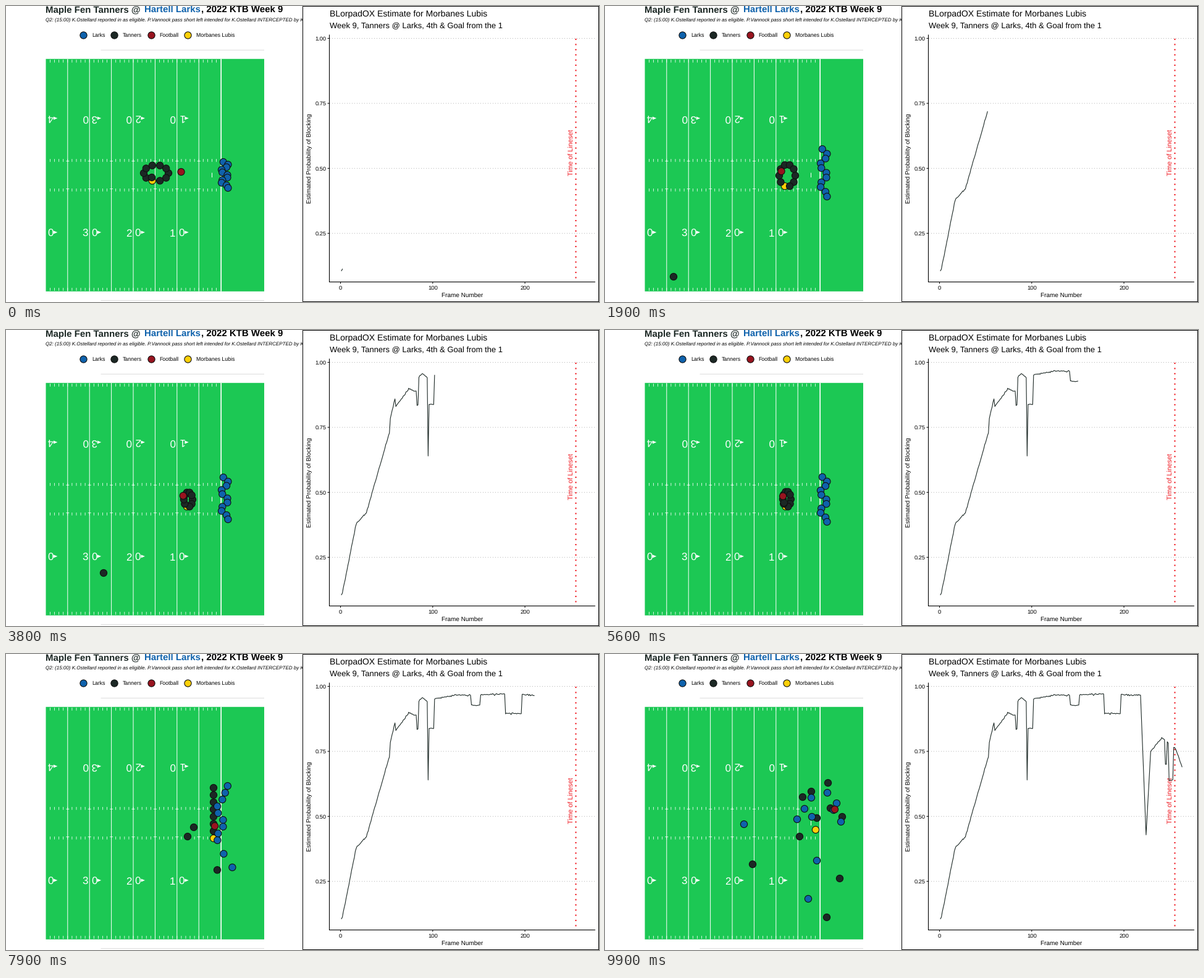
A matplotlib script for the animation above (10 s loop, 960 by 480 pixels).

```python
import matplotlib.pyplot as plt
import numpy as np
from matplotlib.animation import FuncAnimation
from matplotlib.patches import Polygon, Rectangle

plt.rcParams.update({"font.family": "Liberation Sans",
                     "text.hinting": "none", "path.snap": False})

W, H, FRAMES = 960, 480, 100
PT = 0.72  # points per pixel at 100 dpi
NAVY, DARK, BROWN, GOLD = "#0f62ac", "#1c2825", "#98141f", "#fdd008"
GREEN, RED = "#1cc854", "#f01820"

fig = plt.figure(figsize=(W / 100, H / 100), dpi=100, facecolor="white")
ax = fig.add_axes([0, 0, 1, 1])
ax.set(xlim=(0, W), ylim=(H, 0))
ax.axis("off")


def text(x, y, s, size, color="black", z=3, **kw):
    return ax.text(x, y, s, fontsize=size * PT, color=color, zorder=z,
                   va="baseline", rotation_mode="anchor", **kw)


def line(x0, y0, x1, y1, color="black", width=1.0, z=2, **kw):
    ax.plot([x0, x1], [y0, y1], color=color, lw=width * PT, zorder=z,
            solid_capstyle="butt", dash_capstyle="butt", **kw)


def dots(points, colors):
    return ax.scatter(*np.transpose(points), s=(11.2 * PT) ** 2, c=colors,
                      edgecolors="#101010", linewidths=1.1 * PT, zorder=4)


# ---- field panel ----
def draw_header():
    text(64.5, 11, "Maple Fen Tanners @", 15, DARK, weight="bold")
    text(224.5, 11, "Hartell Larks", 15, NAVY, weight="bold")
    text(316, 11, ", 2022 KTB Week 9", 15, weight="bold")
    text(64.5, 25.5, "Q2: (15:00) K.Ostellard reported in as eligible. "
         "P.Vannock pass short left intended for K.Ostellard "
         "INTERCEPTED by K", 8, style="italic")
    for x, color, label in ((125, NAVY, "Larks"), (174.5, DARK, "Tanners"),
                            (234.5, BROWN, "Football"),
                            (294, GOLD, "Morbanes Lubis")):
        dots([(x, 46.5)], [color])
        text(x + 14, 50, label, 8.8)
    for y in (71.5, 477.5):
        line(153.5, y, 418, y, "#dcdcdc")


def draw_field():
    left, right, top, bottom, goal, yard = 64.5, 418, 85.8, 462.8, 347.6, 7.08
    ax.add_patch(Rectangle((left, top), right - left, bottom - top,
                           fc=GREEN, ec="none", zorder=1))
    marks = goal - yard * np.arange(1, 40)
    for y in (87, 248, 296, 457):
        ax.vlines(marks, y, y + 4.7, color="white", lw=0.8 * PT, zorder=2)
    for i in range(1, 8):
        x = goal - 5 * yard * i
        line(x, top, x, bottom, "white")
        for y in (251.5, 296.5):
            line(x - 2.5, y, x + 2.5, y, "white", 0.8)
    line(348.2, top, 348.2, bottom, "white", 1.7)
    line(333.5, 270.5, 333.5, 278, "white")

    for n in range(1, 5):
        x = goal - 10 * yard * n
        outer = [(str(n), "0")] if n < 4 else []  # the 40 is cut by the edge
        for low, high in outer:
            text(x - 7, 374, low, 17, "white", ha="center")
            text(x - 7, 176, high, 17, "white", ha="center", rotation=180)
        text(x + 7.5, 374, "0", 17, "white", ha="center")
        text(x + 7.5, 176, str(n), 17, "white", ha="center", rotation=180)
        for y in (182, 367):
            ax.add_patch(Polygon([(x + 12.5, y - 2.6), (x + 19, y),
                                  (x + 12.5, y + 2.6)],
                                 fc="white", ec="none", zorder=3))


# ---- chart panel ----
def chart_x(n):
    return 541.6 + 1.4925 * n


def chart_y(p):
    return 52.5 + 421.6 * (1 - p)


def draw_chart():
    ax.add_patch(Rectangle((480.5, 0.5), 479, 479, fc="white", ec="black",
                           lw=PT, zorder=5))
    text(523.5, 17, "BLorpadOX Estimate for Morbanes Lubis", 14, z=6)
    text(523.5, 36, "Week 9, Tanners @ Larks, 4th & Goal from the 1", 13, z=6)
    for p in (0.25, 0.5, 0.75, 1):
        y = chart_y(p)
        line(524, y, 954, y, "#b4b4b4", 1, 6, ls=(0, (1, 3)))
        line(520.5, y, 523.5, y, z=6)
        text(518.5, y + 3.3, f"{p:.2f}", 9.3, z=6, ha="right")
    for n in (0, 100, 200):
        x = chart_x(n)
        line(x, 447.5, x, 450.5, z=6)
        text(x, 460, str(n), 9.5, z=6, ha="center")
    line(523.5, 46.5, 523.5, 448, width=1.1, z=6)
    line(523, 447.5, 954, 447.5, width=1.1, z=6)
    text(738.7, 472, "Frame Number", 10, z=6, ha="center")
    text(493.5, 247, "Estimated Probability of Blocking", 10, z=6,
         rotation=90, ha="center")
    line(922.5, 53, 922.5, 447, RED, 2.1, 6, ls=(0, (1, 3)))
    text(918.5, 238, "Time of Lineset", 11, RED, 6, rotation=90, ha="center")


def probability(n):
    """Slow trend, sudden drops to a lower level, and a little jitter."""
    trend = [(1, .107), (2, .113), (17, .38), (28, .422), (53, .73),
             (54, .785), (59, .86), (60, .83), (74, .898), (82, .89),
             (85, .944), (89, .959), (94, .942), (104, .953), (123, .965),
             (172, .97), (218, .966), (224, .429), (229, .75), (241, .802),
             (256, .76), (263, .69)]
    drops = [(83, 84, .833), (95, 95, .638), (96, 101, .838),
             (142, 151, .927), (179, 196, .896), (245, 246, .7),
             (249, 253, .638)]
    p = np.interp(n, *np.transpose(trend))
    for first, last, level in drops:
        p[(n >= first) & (n <= last)] = level
    return p + np.random.default_rng(4).normal(0, 0.0015, n.size)


# ---- formations: 10 in the huddle ring, then 11 defenders ----
slot = np.arange(10)
back = np.arange(11)
depth = 6 * np.cos(2 * np.pi * (back - 5.5) / 4.2)  # staggered rows
END, PASSER, RUNNER = 3, 5, 4                       # ring slots


def formation(ox, oy, dx, dy):
    return np.vstack([np.column_stack([ox, oy]), np.column_stack([dx, dy])])


def huddle(cx, cy, rx, ry, top, bottom):
    a = 2 * np.pi * slot / 10
    return formation(cx + rx * np.cos(a), cy + ry * np.sin(a),
                     354 + depth, np.linspace(top, bottom, 11))


def scrimmage(offense_x, defense_x):
    rank = np.zeros(10)
    rank[[8, 7, 9, 6, 0, 1, 2, END]] = np.arange(8)  # line, top to bottom
    ox, oy = np.full(10, offense_x), 217 + 11.7 * rank
    ox[PASSER], oy[PASSER] = 304, 281
    ox[RUNNER], oy[RUNNER] = 294, 296
    dx = defense_x + depth + 14 * ((back - 5) / 5) ** 8
    return formation(ox, oy, dx, 214 + 11 * back + 11 * np.maximum(back - 8, 0))


whistle = np.array([
    (384, 264), (343, 266), (315, 296), (341, 285), (380, 364),
    (239, 341), (365, 250), (334, 223), (361, 209), (320, 232),
    (360, 225), (334, 233), (323, 251), (335, 264), (382, 272), (375, 242),
    (370, 253), (311, 268), (225, 276), (343, 335), (329, 397)])

poses = {
    0: huddle(243, 271, 20, 13, 253, 295),
    19: huddle(295, 275, 13, 18, 232, 309),
    38: huddle(295, 275, 7, 12, 239, 307),
    69: huddle(294, 274, 6, 13, 238, 314),
    78: scrimmage(336, 347),
    85: scrimmage(336, 347),
    88: scrimmage(331, 336),
    99: whistle,
}
# the receiver runs to the sideline and back; the ball is (time, x, y) too
receiver = [(0, 236, 278), (19, 111, 439), (26, 94, 468), (33, 114, 444),
            (38, 158, 394), (50, 288, 282), (69, 294, 276), (78, 342, 349),
            (82, 342, 354), (88, 342, 343), (99, 359, 427)]
ball = [(0, 283.5, 269), (19, 285.5, 268), (69, 289, 270), (78, 338, 279),
        (85, 338, 279), (88, 300, 281), (93, 273, 307), (96, 366, 255),
        (99, 372, 252)]


def along(keys, k):
    t, x, y = np.transpose(keys)
    return np.interp(k, t, x), np.interp(k, t, y)


def team_positions(k):
    times = list(poses)
    i = min(np.searchsorted(times, k, side="right"), len(times) - 1)
    t0, t1 = times[i - 1], times[i]
    u = (k - t0) / (t1 - t0)
    return (1 - u) * poses[t0] + u * poses[t1]


def positions(k):
    """Bottom to top: tight end, offense, receiver, defense, ball."""
    team = team_positions(k)
    return np.vstack([team[END], np.delete(team[:10], END, axis=0),
                      along(receiver, k), team[10:], along(ball, k)])


draw_header()
draw_field()
draw_chart()

samples = np.arange(1, 264)
curve = probability(samples)
trace, = ax.plot([], [], color=DARK, lw=1.1 * PT, zorder=7,
                 solid_joinstyle="round")
players = dots(positions(0), [GOLD] + [DARK] * 10 + [NAVY] * 11 + [BROWN])


def draw(k):
    players.set_offsets(positions(k))
    n = round(2 + 261 * k / (FRAMES - 1))
    trace.set_data(chart_x(samples[:n]), chart_y(curve[:n]))
    return players, trace


anim = FuncAnimation(fig, draw, frames=FRAMES, interval=100, repeat=True,
                     repeat_delay=0, blit=False)
plt.show()
```
